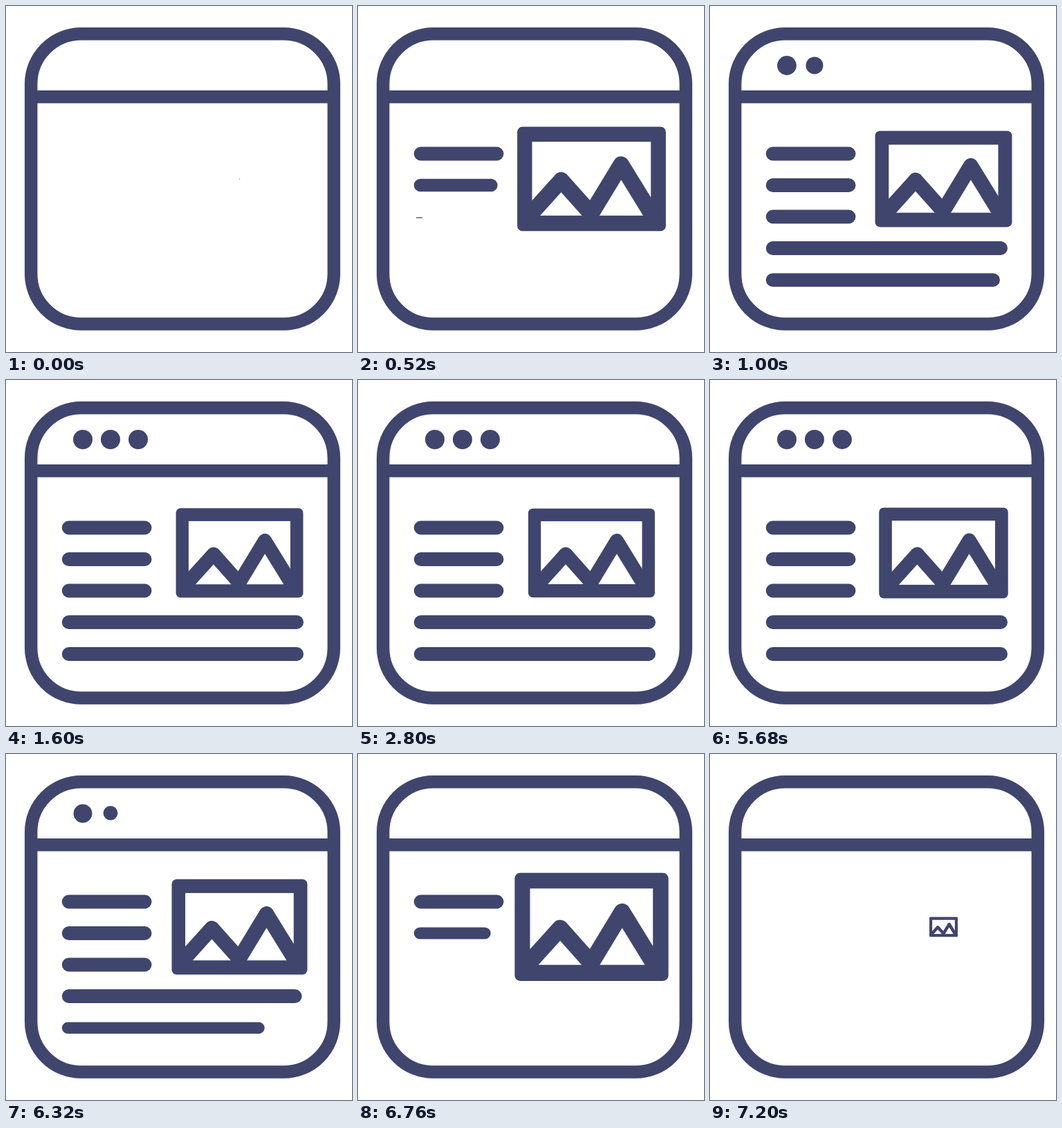
These frames come from a looping animation (500x500 px, 7.24 s). An HTML page:

```html
<!DOCTYPE html>
<html lang="en">
<head>
<meta charset="utf-8">
<title>Page layout icon</title>
<style>
  html, body { margin: 0; width: 100%; height: 100%; overflow: hidden; background: #fff; }
  svg { display: block; width: 100%; height: 100%; }
</style>
</head>
<body>
<svg viewBox="0 0 500 500" fill="#3f456d" stroke="none">
  <g fill="none" stroke="#3f456d" stroke-width="18.5">
    <rect x="36.2" y="40.2" width="437.6" height="419.4" rx="72.5"/>
    <path d="M27 131.3H483"/>
  </g>
  <g id="dots"></g>
  <g id="lines"></g>
  <g id="picture">
    <rect x="245.7" y="185.4" width="183.6" height="129" rx="6.5"/>
    <rect x="264" y="204" width="146.8" height="91.2" fill="#fff"/>
    <path d="M258 298L300 251.5L337 293L374 232L414 297" fill="none"
      stroke="#3f456d" stroke-width="20" stroke-linejoin="round"/>
  </g>
</svg>
<script>
const LOOP = 7240;
const PEAK = 480;

const dots = [
  { x: 111, start: 577 },
  { x: 151, start: 728 },
  { x: 191, start: 1110 }
];
const lines = [
  { y: 213.5, right: 210.5, start: 38, anchor: [77, 215] },
  { y: 259, right: 210.5, start: 308, anchor: [81, 259] },
  { y: 304.5, right: 210.5, start: 512, anchor: [84, 306] },
  { y: 350, right: 430, start: 628, anchor: [81, 350] },
  { y: 396, right: 430, start: 755, anchor: [81, 395] }
];
const picture = document.getElementById("picture");

function add(parentId, tag, attributes) {
  const node = document.createElementNS("http://www.w3.org/2000/svg", tag);
  for (const name in attributes) node.setAttribute(name, attributes[name]);
  return document.getElementById(parentId).appendChild(node);
}

for (const dot of dots) dot.node = add("dots", "circle", { cx: dot.x, cy: 86 });
for (const line of lines) {
  line.node = add("lines", "rect", {
    x: 80.8, y: line.y - 10, width: line.right - 80.8, height: 20, rx: 10
  });
}

const progress = (t, start, duration) => Math.min(1, Math.max(0, (t - start) / duration));
const easeOut = (p, power = 3) => 1 - (1 - p) ** power;

function scaleAbout(node, scale, [x, y]) {
  node.setAttribute("transform", `translate(${x} ${y}) scale(${scale}) translate(${-x} ${-y})`);
}

// Quick growth past full size, then a damped wobble.
function springScale(t) {
  if (t < PEAK) return 1.21 * easeOut(t / PEAK, 2.4);
  const age = t - PEAK;
  const swing = Math.max(0.006, 0.21 * Math.exp(-0.00185 * age));
  return 1 + swing * Math.cos(Math.PI * age / 250);
}

function render(time) {
  // The second half retraces the first.
  const t = Math.min(time, LOOP - time);
  scaleAbout(picture, springScale(t), [337.5, 250]);
  for (const line of lines) {
    scaleAbout(line.node, easeOut(progress(t, line.start, 360)), line.anchor);
  }
  for (const dot of dots) {
    const p = progress(t, dot.start, 520);
    dot.node.setAttribute("r", 14 * easeOut(p));
    dot.node.setAttribute("cy", 86 - 25 * (1 - p) ** 8);
  }
}

const origin = performance.now();
function tick() {
  render((performance.now() - origin) % LOOP);
  requestAnimationFrame(tick);
}
render(0);
requestAnimationFrame(tick);
</script>
</body>
</html>
```
